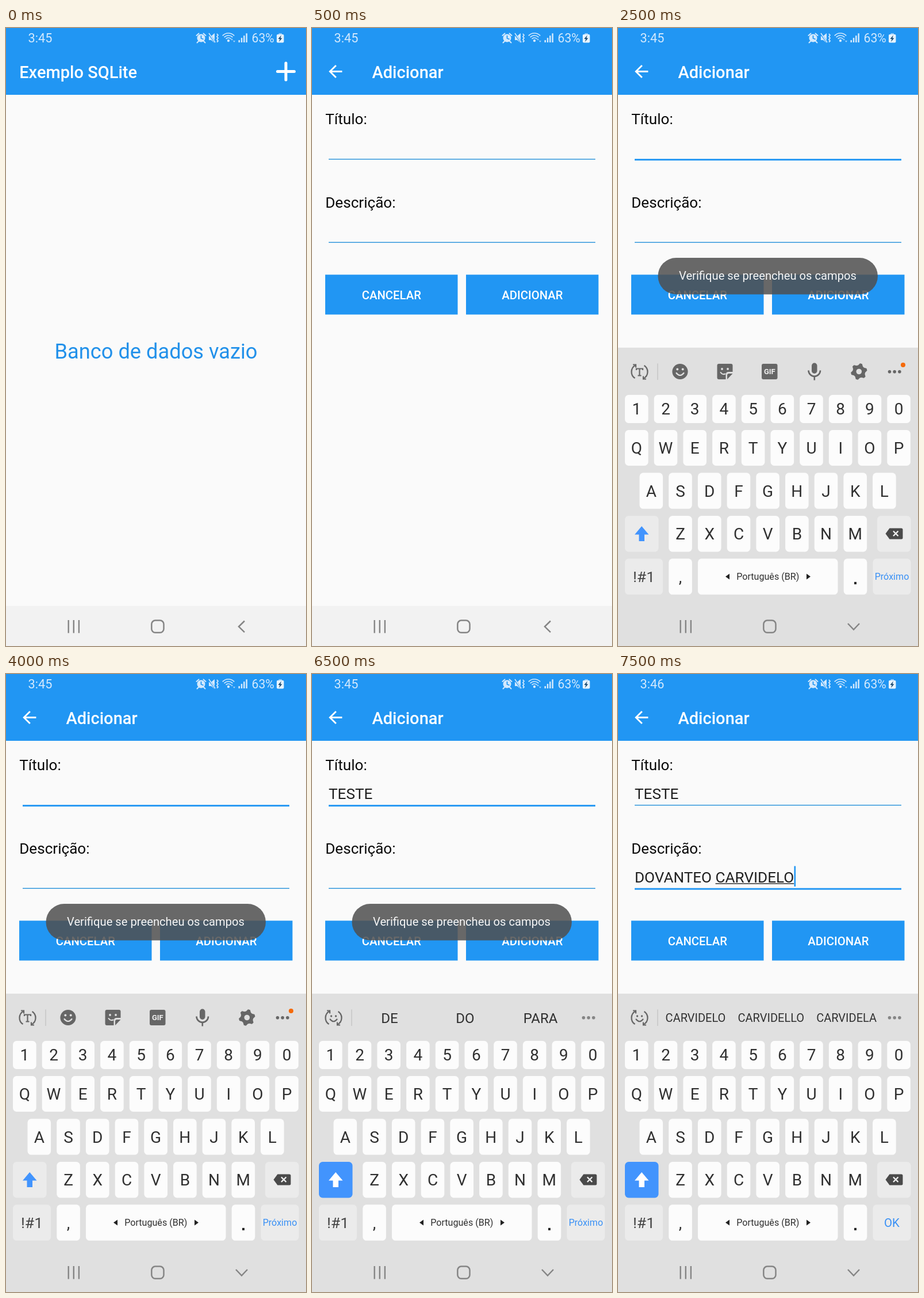
Animation, 522 px wide and 1073 px high, one loop 8000 ms. Source, as an HTML page with a canvas:

```html
<!DOCTYPE html>
<html lang="pt-BR">
<head>
<meta charset="utf-8">
<title>Exemplo SQLite</title>
<style>
  html, body { margin: 0; width: 100%; height: 100%; overflow: hidden; background: #fafafa; }
  canvas { display: block; width: 522px; height: 1073px; }
</style>
</head>
<body>
<canvas id="stage"></canvas>
<script>
const W = 522, H = 1073, LOOP = 8000;
const BLUE = '#2196f3', PALE = '#d3e9fd', INK = '#303030', ICON = '#666', KEYBLUE = '#4294fd';
const FAMILY = 'Roboto, "Noto Sans", sans-serif';

const canvas = document.getElementById('stage');
const dpr = window.devicePixelRatio || 1;
canvas.width = W * dpr;
canvas.height = H * dpr;
const c = canvas.getContext('2d');
c.scale(dpr, dpr);

function rect(x, y, w, h, fill) {
  c.fillStyle = fill;
  c.fillRect(x, y, w, h);
}

function round(x, y, w, h, r, fill) {
  c.beginPath();
  c.roundRect(x, y, w, h, r);
  c.fillStyle = fill;
  c.fill();
}

function dot(x, y, r, fill) {
  c.beginPath();
  c.arc(x, y, r, 0, 7);
  c.fillStyle = fill;
  c.fill();
}

function text(str, x, y, size, fill, align = 'left', weight = 400) {
  c.font = `${weight} ${size}px ${FAMILY}`;
  c.textAlign = align;
  c.fillStyle = fill;
  c.fillText(str, x, y);
}

function fillPath(d, fill, x = 0, y = 0, scale = 1) {
  c.save();
  c.translate(x, y);
  c.scale(scale, scale);
  c.fillStyle = fill;
  c.fill(new Path2D(d), 'evenodd');
  c.restore();
}

function strokePath(d, color, width, cap = 'butt', x = 0, y = 0) {
  c.save();
  c.translate(x, y);
  c.strokeStyle = color;
  c.lineWidth = width;
  c.lineCap = cap;
  c.lineJoin = cap === 'round' ? 'round' : 'miter';
  c.stroke(new Path2D(d));
  c.restore();
}

function statusBar(clock) {
  text(clock, 38.5, 25, 21.7, PALE);
  // alarm
  dot(339.5, 17.5, 7, PALE);
  strokePath('M331.5 13l4-3.5M347.5 13l-4-3.5M335 23l-2.5 2.5M344 23l2.5 2.5', PALE, 2, 'round');
  strokePath('M339.5 13v5l4 1.5', BLUE, 1.8);
  // muted speaker with vibration
  fillPath('M353 14h4l6-5v17l-6-5h-4z', PALE);
  strokePath('M352 9l12 16', BLUE, 3);
  strokePath('M353 9l11 16', PALE, 1.6);
  strokePath('M367 10l2 2.5-2 2.5 2 2.5-2 2.5 2 2.5-2 2', PALE, 1.8);
  // wifi
  c.strokeStyle = PALE;
  c.lineWidth = 1.7;
  for (const r of [6, 10, 14]) {
    c.beginPath();
    c.arc(387, 23, r, -Math.PI * .76, -Math.PI * .24);
    c.stroke();
  }
  dot(387, 22, 2.2, PALE);
  fillPath('M391 21l2-3 2 3zM395 22h4l-2 3z', '#9ccffa');
  for (let i = 0; i < 4; i++) rect(404.5 + i * 4.3, 21 - i * 3.9, 2.5, 4 + i * 3.9, PALE);
  text('63%', 427.5, 25, 21.2, PALE);
  // charging battery
  rect(474.5, 9, 5.5, 3, '#8ec8fa');
  round(471, 11, 12.5, 14.5, 2, '#e6f3fe');
  fillPath('M479 12.5l-5.5 6.5h3l-1.500 5 5.500-6.500h-3z', '#17476f');
}

function header(s) {
  rect(0, 0, W, 116, BLUE);
  statusBar(s.clock);
  if (s.home) {
    text('Exemplo SQLite', 23.2, 86.5, 29, '#fff', 'left', 500);
    strokePath('M472.500 75.500h29M487 61v29', '#fff', 5, 'round');
  } else {
    fillPath('M20 11H7.83l5.59-5.59L12 4l-8 8 8 8 1.410-1.410L7.830 13H20z', '#fff', 23.4, 58.1, 1.45);
    text('Adicionar', 104.4, 86.5, 29, '#fff', 'left', 500);
  }
}

function field(label, y, value, focus) {
  text(label, 23.2, y, 26.1, '#0a0a0a');
  if (value) text(value, 29, y + 50, 26.1, '#1f1f1f');
  if (focus) rect(29, y + 60.2, 464, 2.9, BLUE);
  else rect(29, y + 60, 464, 1.5, '#3298dc');
}

function button(label, x) {
  rect(x, 428.3, 230.5, 69.2, BLUE);
  text(label, x + 115.3, 470.8, 20.3, '#fff', 'center', 500);
}

function form(s) {
  field('Título:', 167, s.title, s.focus === 1);
  field('Descrição:', 311.5, s.desc, s.focus === 2);
  if (s.desc) {
    const end = 29 + c.measureText(s.desc).width;
    const start = 29 + c.measureText(s.desc.split(' ')[0] + ' ').width;
    rect(start, 363.3, end - start, 1.4, '#222');
    rect(306.5, 333.5, 2.6, 35.5, BLUE);
  }
  button('CANCELAR', 23);
  button('ADICIONAR', 268);
}

function toast() {
  round(69.5, 399, 382.5, 63.5, 31.7, 'rgba(79,79,79,.85)');
  text('Verifique se preencheu os campos', 260.5, 436.5, 20.2, '#f6f6f6', 'center');
}

function navBar(s) {
  const grey = '#858585';
  if (!s.keys) rect(0, 1003.5, W, 70, '#f2f2f2');
  strokePath('M108.700 1028v22.500M117.800 1028v22.500M126.900 1028v22.500', grey, 2.4);
  c.beginPath();
  c.roundRect(253.3, 1028.6, 21.2, 21.2, 6.5);
  c.strokeStyle = grey;
  c.lineWidth = 2.5;
  c.stroke();
  strokePath(s.keys ? 'M400 1034l10 10.500 10-10.500' : 'M415 1029.500l-10 9.800 10 9.800', grey, 2.5);
}

function cycleIcon(face) {
  strokePath('M-7-11.500A13 13 0 0 0-8 11M7 11.500A13 13 0 0 0 8-11', ICON, 2.3, 'butt', 37.5, 597);
  strokePath('M-11.500-12.500h5v5M11.500 12.500h-5v-5', ICON, 2.2, 'butt', 37.5, 597);
  if (face) {
    dot(33.5, 594, 1.7, ICON);
    dot(41.5, 594, 1.7, ICON);
    strokePath('M-6 2.500Q0 10 6 2.500', ICON, 2.2, 'round', 37.5, 597);
  } else {
    strokePath('M-5.500-3v-2.500h11V-3M0-5.500V6.500M-3 6.500h6', ICON, 2.2, 'butt', 37.5, 597);
  }
}

function smile(x, y, gap) {
  dot(x - gap, y - 4, 2, '#e0e0e0');
  dot(x + gap, y - 4, 2, '#e0e0e0');
  strokePath('M-6.500 2.500Q0 10.500 6.500 2.500', '#e0e0e0', 2.2, 'round', x, y);
}

function gear(x, y) {
  c.beginPath();
  for (let i = 0; i < 24; i++) {
    const a = (i + .5) * Math.PI / 12;
    const r = i % 4 < 2 ? 11 : 14.3;
    c.lineTo(x + r * Math.cos(a), y + r * Math.sin(a));
  }
  c.fillStyle = ICON;
  c.fill();
  dot(x, y, 4.8, '#e0e0e0');
}

function tools() {
  dot(108, 596.5, 13.6, ICON);
  smile(108, 596.5, 4.7);
  // sticker
  fillPath('M175.500 583h21q3 0 3 3v11h-7q-5 0-5 5v8h-12q-3 0-3-3v-21q0-3 3-3zM190 610v-7q0-3 3-3h6.500z', ICON);
  dot(181, 592, 1.9, '#e0e0e0');
  dot(191, 592, 1.9, '#e0e0e0');
  strokePath('M178.500 598q3.500 4.500 8 2.500', '#e0e0e0', 2, 'round');
  round(250, 583, 27.5, 27, 3, ICON);
  text('GIF', 263.8, 601.3, 13, '#f0f0f0', 'center', 700);
  // microphone
  round(337, 581.5, 9.5, 18.5, 4.75, ICON);
  strokePath('M331.500 594.500a10.200 10.200 0 0 0 20.500 0M341.800 605v6.500', ICON, 2.6);
  gear(419.3, 596.5);
  dot(496, 585, 4, '#f56a0a');
}

function suggestions(s) {
  const big = s.words[0].length < 5;
  s.words.forEach((word, i) => {
    text(word, 135 + i * 131.3, big ? 605.7 : 604.2, big ? 24 : 20, INK, 'center');
  });
}

function key(label, x, y, w = 40.6, h = 62.5, fill = '#fcfcfc', size = 28, ink = INK) {
  round(x, y, w, h, 6.5, fill);
  if (label) text(label, x + w / 2, y + h / 2 + size * .356, size, ink, 'center');
}

function keyRow(letters, x, y, h) {
  [...letters].forEach((ch, i) => key(ch, x + i * 50.7, y, 40.6, h));
}

function keyboard(s) {
  const soft = '#ebebeb';
  rect(0, 555, W, H - 555, '#e0e0e0');
  cycleIcon(!!s.words);
  rect(68.3, 582.5, 1.4, 28.5, '#c3c3c3');
  if (s.words) suggestions(s);
  else tools();
  for (const x of [472.5, 481.2, 489.9]) dot(x, 596.7, 2.8, s.words ? '#858585' : ICON);

  keyRow('1234567890', 12, 637, 49);
  keyRow('QWERTYUIOP', 12, 698, 62);
  keyRow('ASDFGHJKL', 37.5, 772.3, 62.5);
  keyRow('ZXCVBNM', 88.3, 847, 62.5);

  key('', 12, 847, 58.5, 62.5, s.words ? KEYBLUE : soft);
  fillPath('M41.200 865l12.300 14.500h-7.500V891h-9.500v-11.500h-7.500z', s.words ? '#fff' : KEYBLUE);
  key('', 451, 847, 58.5, 62.5, soft);
  fillPath('M472.500 868.500H493q2.500 0 2.500 2.500v14q0 2.500-2.500 2.500h-20.500l-7-9.500z', '#4a4a4a');
  strokePath('M479 873.500l8.500 8.500M487.500 873.500l-8.500 8.500', '#f4f4f4', 2.3);

  const y = 921.3;
  key('!#1', 12, y, 66, 62.5, soft, 26.5, '#444');
  key('', 88.3, y);
  text(',', 108.6, 963, 28, INK, 'center');
  key('Português (BR)', 139, y, 243.5, 62.5, '#fcfcfc', 16.1);
  fillPath('M194 947.500v10l-7-5zM328 947.500v10l7-5z', '#222');
  key('', 392.7, y);
  rect(411, 961.8, 4, 4, '#222');
  const ok = s.action === 'OK';
  key(s.action, 443.5, y, 66, 62.5, soft, ok ? 20.5 : 16.1, '#3990f5');
}

const form0 = { clock: '3:45' };
const typing = { ...form0, keys: true, focus: 1, toast: true, action: 'Próximo' };
const scenes = [
  { at: 0, clock: '3:45', home: true },
  { at: 500, ...form0 },
  { at: 2500, ...typing },
  { at: 5000, ...typing, title: 'TESTE', words: ['DE', 'DO', 'PARA'] },
  { at: 7500, clock: '3:46', keys: true, focus: 2, action: 'OK', title: 'TESTE',
    desc: 'DOVANTEO CARVIDELO', words: ['CARVIDELO', 'CARVIDELLO', 'CARVIDELA'] }
];

function draw(t) {
  const s = scenes.filter(scene => scene.at <= t).pop();
  rect(0, 0, W, H, '#fafafa');
  header(s);
  if (s.home) text('Banco de dados vazio', 261, 574, 36.25, '#2291ea', 'center');
  else form(s);
  if (s.toast) toast();
  if (s.keys) keyboard(s);
  navBar(s);
}

const begin = performance.now();
function tick() {
  draw((performance.now() - begin) % LOOP);
  requestAnimationFrame(tick);
}
tick();
</script>
</body>
</html>
```
